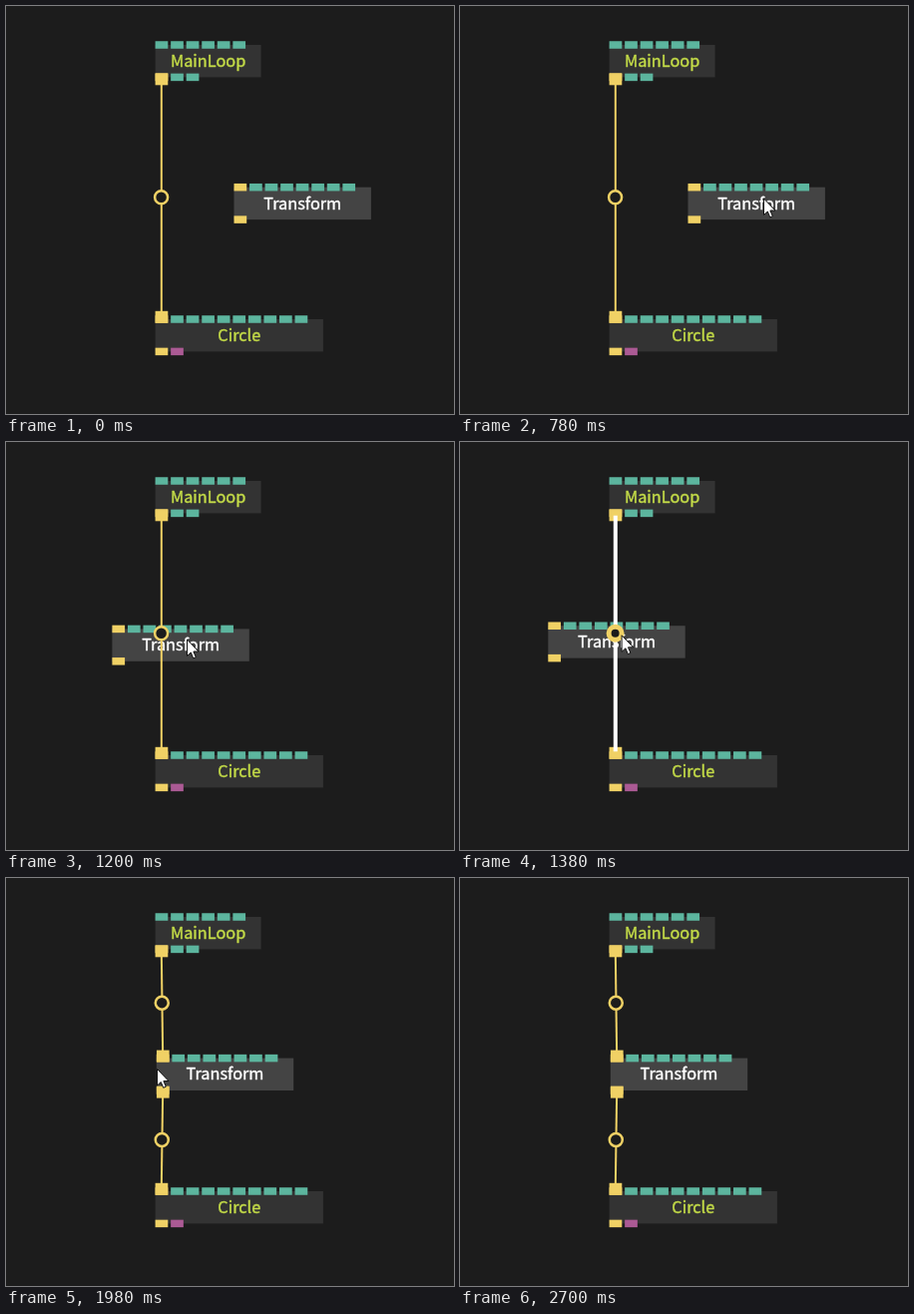
These frames come from a looping animation (449x409 px, 3360 ms). An HTML page with a canvas:

```html
<!DOCTYPE html>
<html lang="en">
<head>
<meta charset="utf-8">
<title>Dropping a node onto a link</title>
<style>
  html, body { margin: 0; width: 100%; height: 100%; overflow: hidden; background: #1c1c1c; }
  canvas { display: block; }
</style>
</head>
<body>
<canvas id="stage" width="449" height="409"></canvas>
<script>
const ctx = document.getElementById('stage').getContext('2d');
const LOOP = 3360, STEP = 60;
const ENTER = 240, DRAG = 780, HOVER = 1320, DROP = 1980, LEAVE = 2700;
const BACK = '#1c1c1c', YELLOW = '#f0d165', TEAL = '#5cb59e', PURPLE = '#ab5a94', LIME = '#c5dd48';
const NODE_H = 32.4, PORT_W = 12.7, PORT_H = 7.5, PORT_PITCH = 15.55;
const LINK_X = 155.8, LINK_TOP = 73.3, LINK_BOTTOM = 311.8;

const entry = { x: 424, y: 156 };
const grabPoint = { x: 308, y: 192.5 };
const nodeStart = { x: 228.5, y: 181.7 };
const nodeEnd = { x: 150.8, y: 180.6 };

// Pointer moves, resting in between; power > 1 slows down, < 1 speeds up.
const moves = [
  { start: 240, end: 400, x: 340, y: 200, power: 1 },
  { start: 400, end: 540, ...grabPoint, power: 1.5 },
  { start: 720, end: 780, x: 304.5, y: 193, power: 1 },
  { start: 780, end: 960, x: 228, y: 200.3, power: 1.2 },
  { start: 960, end: 1200, x: 181.5, y: 198, power: 1.7 },
  { start: 1200, end: 1560, x: 151.5, y: 191.5, power: 1.5 },
  { start: 2100, end: 2220, x: 153.5, y: 191.5, power: 1 },
  { start: 2400, end: 2640, x: 438, y: 65, power: 0.5 }
];

function pointerAt(time) {
  let { x, y } = entry;
  for (const move of moves) {
    const u = Math.min(Math.max((time - move.start) / (move.end - move.start), 0), 1);
    const k = 1 - (1 - u) ** move.power;
    x += (move.x - x) * k;
    y += (move.y - y) * k;
  }
  return { x, y };
}

// The dragged node trails the pointer by one step.
function transformAt(time) {
  if (time < DRAG) return nodeStart;
  if (time >= DROP) return nodeEnd;
  const p = pointerAt(time - STEP);
  return { x: nodeStart.x + p.x - grabPoint.x, y: nodeStart.y + p.y - grabPoint.y };
}

function rect(color, x, y, w, h) {
  ctx.fillStyle = color;
  ctx.fillRect(x, y, w, h);
}

const teal = count => Array(count).fill(TEAL);

function ports(colors, x, edge) {
  colors.forEach((color, i) => rect(color, x + i * PORT_PITCH, edge - PORT_H / 2, PORT_W, PORT_H));
}

function label(text, x, y, color) {
  ctx.fillStyle = ctx.strokeStyle = color;
  ctx.lineWidth = 0.4;
  ctx.fillText(text, x, y);
  ctx.strokeText(text, x, y);
}

function node(name, x, y, w, inputs, outputs, fill = '#333', ink = LIME) {
  rect(fill, x, y, w, NODE_H);
  ports(inputs, x, y);
  ports(outputs, x, y + NODE_H);
  label(name, x + w / 2, y + 21.8, ink);
}

function link(x1, y1, x2, y2, hover) {
  for (const [x, y] of [[x1, y1], [x2, y2]]) rect(YELLOW, x - 6.2, y - 6, PORT_W, 12);
  ctx.beginPath();
  ctx.moveTo(x1, y1 + 0.5);
  ctx.lineTo(x2, y2 - 1.5);
  ctx.lineWidth = hover ? 4 : 2;
  ctx.strokeStyle = hover ? '#fff' : YELLOW;
  ctx.stroke();

  ctx.beginPath();
  ctx.arc((x1 + x2) / 2 - 0.2, (y1 + y2) / 2 - 0.8, 6.5, 0, Math.PI * 2);
  ctx.fillStyle = BACK;
  ctx.fill();
  ctx.lineWidth = hover ? 5 : 2.5;
  ctx.strokeStyle = YELLOW;
  ctx.stroke();
}

const arrow = new Path2D('M0 0V16.5L3.8 13L6.2 18.8L8.8 17.7L6.4 12H11.5Z');

function pointer({ x, y }) {
  ctx.save();
  ctx.translate(x, y);
  ctx.fillStyle = '#fff';
  ctx.fill(arrow);
  ctx.lineWidth = 1;
  ctx.strokeStyle = '#111';
  ctx.stroke(arrow);
  ctx.restore();
}

function draw(time) {
  rect(BACK, 0, 0, 449, 409);
  ctx.font = '16.3px "Noto Sans CJK JP", "Noto Sans CJK SC", "Noto Sans CJK", "Noto Sans", sans-serif';
  ctx.textAlign = 'center';
  ctx.lineJoin = 'round';

  const { x, y } = transformAt(time);
  node('MainLoop', 149.6, 39, 106, teal(6), [YELLOW, ...teal(2)]);
  node('Circle', 149.6, 314, 168.3, [YELLOW, ...teal(9)], [YELLOW, PURPLE]);
  node('Transform', x, y, 137.4, [YELLOW, ...teal(7)], [YELLOW], '#444', '#fff');

  if (time < DROP) {
    link(LINK_X, LINK_TOP, LINK_X, LINK_BOTTOM, time >= HOVER);
  } else {
    const portX = nodeEnd.x + PORT_W / 2;
    link(LINK_X, LINK_TOP, portX, nodeEnd.y - 2);
    link(portX, nodeEnd.y + NODE_H + 1.6, LINK_X, LINK_BOTTOM);
  }
  if (time >= ENTER && time < LEAVE) pointer(pointerAt(time));
}

const start = performance.now();
function tick() {
  const time = (performance.now() - start) % LOOP;
  draw(Math.floor((time + 1) / STEP) * STEP % LOOP);
  requestAnimationFrame(tick);
}
tick();
</script>
</body>
</html>
```
